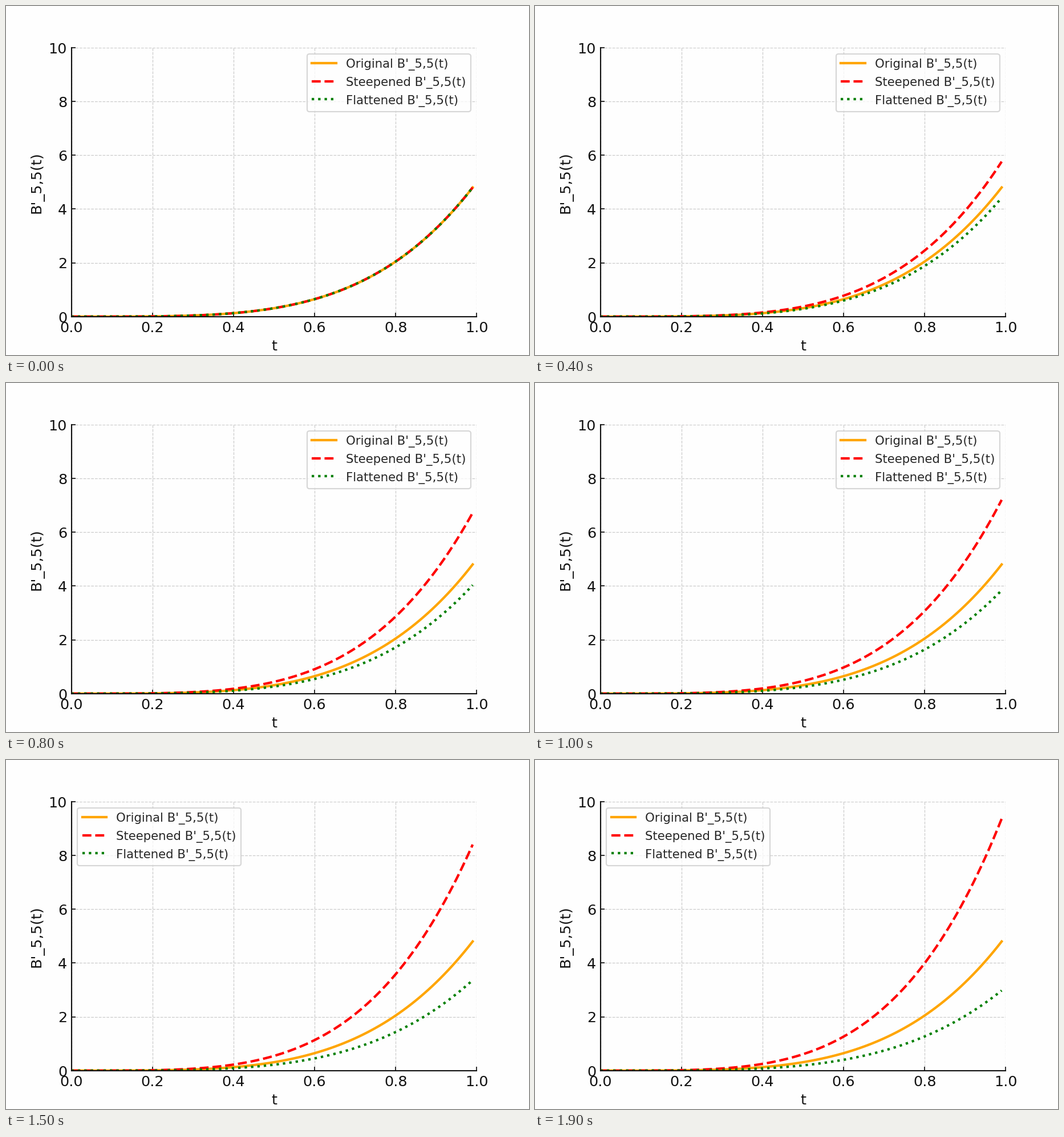
Animation, 917 px wide and 611 px high, one loop 2 s. Source, as a matplotlib script:

```python
import numpy as np
import matplotlib.pyplot as plt
from matplotlib.animation import FuncAnimation

DPI = 152.84  # 6 x 4 inches make a 917 x 611 pixel canvas
FRAMES, INTERVAL = 20, 100
LEGEND_JUMP = 13  # step at which the legend swaps corners
INK = "#111111"

plt.rcParams.update({
    "font.family": "DejaVu Sans",
    "font.size": 10,
    "text.hinting": "force_autohint",
    "text.hinting_factor": 8,
    "axes.labelsize": 12,
    "xtick.labelsize": 12,
    "ytick.labelsize": 12,
    "axes.edgecolor": INK,
    "axes.labelcolor": INK,
    "xtick.color": INK,
    "ytick.color": INK,
    "xtick.direction": "in",
    "ytick.direction": "in",
    "axes.linewidth": 1.0,
    "axes.facecolor": "#fefefe",
    "figure.facecolor": "#fefefe",
    "axes.spines.top": False,
    "axes.spines.right": False,
    "axes.axisbelow": True,
    "legend.handleheight": 0.86,
})

fig, ax = plt.subplots(figsize=(6, 4), dpi=DPI)
ax.set(xlim=(0, 1), ylim=(0, 10), xlabel="t", ylabel="B'_5,5(t)")
ax.grid(True, color="#cccccc", linestyle="--", linewidth=0.6)

t = np.arange(100) / 100
base = 5 * t**4

ax.plot(t, base, color="orange", lw=2, label="Original B'_5,5(t)")
steep, = ax.plot(t, base, "--", color="red", lw=2, label="Steepened B'_5,5(t)")
flat, = ax.plot(t, base, ":", color="green", lw=2, label="Flattened B'_5,5(t)")
legend = ax.legend(loc="upper right", labelcolor="#262626")


def update(i):
    steep.set_ydata(base * (1 + 0.05 * i))
    flat.set_ydata(base * (1 - 0.02 * i))
    legend.set_loc("upper right" if i < LEGEND_JUMP else "upper left")
    return steep, flat, legend


anim = FuncAnimation(fig, update, frames=FRAMES, interval=INTERVAL,
                     repeat=True, repeat_delay=0, blit=False)
plt.show()
```
